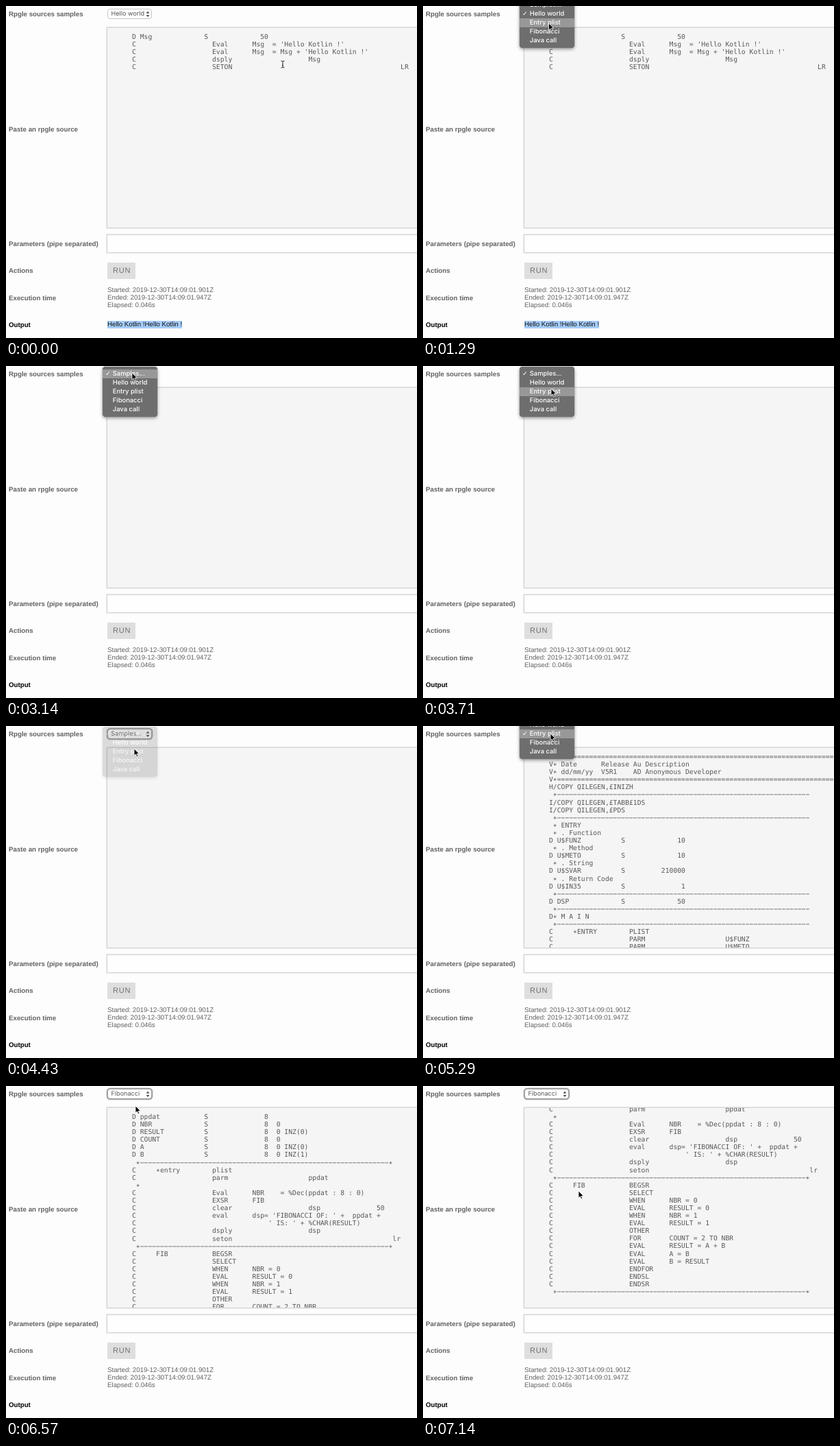
Write an HTML page that moves like this. It is 600 by 484 pixels and loops after 8 s.

```html
<!DOCTYPE html>
<html lang="en">
<head>
<meta charset="utf-8">
<title>RPGLE samples</title>
<style>
html, body { margin: 0; width: 100%; height: 100%; overflow: hidden; background: #fdfdfd; }
body { position: relative; font: 9.72px/12px "Liberation Sans", Arial, sans-serif; color: #626262;
  text-rendering: geometricPrecision; cursor: default; }
body > * { position: absolute; box-sizing: border-box; white-space: pre; }
b { left: 4px; }
#code, #param { left: 147px; width: 480px; border: 1px solid #d2d2d2; box-shadow: 0 0 2px #ccc; }
#code { top: 31px; height: 293px; background: #f6f5f6; overflow: hidden; }
#text { position: absolute; left: 36px; top: 8px; margin: 0; color: #585858;
  font: 9.72px/11.1px "DejaVu Sans Mono", monospace; }
#param { top: 333px; height: 27px; background: #fefefe; }
#run { left: 148px; top: 374px; width: 41px; height: 24px; background: #dedede; color: #707070;
  font-size: 11px; line-height: 24px; letter-spacing: .8px; padding-left: 8px; }
#log { left: 148px; top: 409px; line-height: 11.1px; }
#out { left: 148px; top: 459px; line-height: 11px; background: #a6cdfb; color: #111; }
#select { left: 148px; top: 4px; width: 65px; height: 15px; border: 1px solid #c6c6c6; border-radius: 4px;
  background: #fff; font: 9.1px/13px Inter, sans-serif; padding-left: 4.5px; color: #555; }
#select.focus { box-shadow: 0 0 0 1.3px #a2a2a2; border-color: #a2a2a2; }
#select svg { position: absolute; right: 2px; top: 2px; }
#menu { left: 140.5px; width: 80.5px; padding: 3.7px 0; border-radius: 4.5px; background: #6e6e6e; color: #fff;
  font: 500 9.4px/14.4px Inter, sans-serif; box-shadow: 0 2px 5px rgba(0,0,0,.4), 0 0 1px #444; }
#menu div { position: relative; padding-left: 15.3px; height: 13.05px; }
#menu .hot { background: #989898; }
#menu .on::before { content: "✓"; position: absolute; left: 4.5px; font-family: "DejaVu Sans", sans-serif; }
#arrow, #beam { left: 0; top: 0; overflow: visible; }
</style>
</head>
<body>
<b style="top:7px">Rpgle sources samples</b>
<b style="top:175px">Paste an rpgle source</b>
<b style="top:342px">Parameters (pipe separated)</b>
<b style="top:381px">Actions</b>
<b style="top:421px">Execution time</b>
<b style="top:460px;color:#000">Output</b>
<div id="code"><pre id="text"></pre></div>
<div id="param"></div>
<div id="run">RUN</div>
<div id="log">Started: 2019-12-30T14:09:01.901Z
Ended: 2019-12-30T14:09:01.947Z
Elapsed: 0.046s</div>
<div id="out">Hello Kotlin !Hello Kotlin !</div>
<div id="select"><span id="value"></span><svg width="6" height="10"><path d="M.6 3.8 3 .6 5.4 3.8zM.6 6 3 9.2 5.4 6z" fill="#555"/></svg></div>
<div id="menu"></div>
<svg id="arrow" width="9" height="13"><path d="M0 0V10.2L2.4 8 4 11.8 5.7 11.1 4.1 7.4H7.3Z" fill="#000" stroke="#fff" stroke-width=".8"/></svg>
<svg id="beam" width="6" height="12"><path d="M-2.5-5Q0-5 0-3.5Q0-5 2.5-5M0-3.5V3.5M-2.5 5Q0 5 0 3.5Q0 5 2.5 5M-1 1.5H1" fill="none" stroke="#222"/></svg>
<script>
const $ = id => document.getElementById(id);

// row(column, text, column, text, ...) builds one fixed-format source line
const row = (...p) => {
  let s = '';
  for (let i = 0; i < p.length; i += 2) s = s.padEnd(p[i]) + p[i + 1];
  return s;
};
const C = (op, ...rest) => row(0, 'C', 20, op, ...rest);
const D = (name, col, size) => row(0, 'D ' + name, 18, 'S', col, size);
const rule = 'V*' + '='.repeat(69);
const dash = ' *' + '−'.repeat(63);
const star = ' *' + '−'.repeat(62) + '*';

const names = ['Samples...', 'Hello world', 'Entry plist', 'Fibonacci', 'Java call'];
const sources = [
  [],
  [
    D('Msg', 32, '50'),
    C('Eval', 30, "Msg  = 'Hello Kotlin !'"),
    C('Eval', 30, "Msg  = Msg + 'Hello Kotlin !'"),
    C('dsply', 44, 'Msg'),
    C('SETON', 67, 'LR')
  ],
  [
    rule,
    row(0, 'V* Date', 13, 'Release Au Description'),
    row(0, 'V* dd/mm/yy', 13, 'V5R1', 21, 'AD Anonymous Developer'),
    rule, 'H/COPY QILEGEN,£INIZH',
    dash, 'I/COPY QILEGEN,£TABB£1DS', 'I/COPY QILEGEN,£PDS',
    dash, ' * ENTRY',
    ' * . Function', D('U$FUNZ', 32, '10'),
    ' * . Method', D('U$METO', 32, '10'),
    ' * . String', D('U$SVAR', 28, '210000'),
    ' * . Return Code', D('U$IN35', 33, '1'),
    dash, D('DSP', 32, '50'),
    dash, 'D* M A I N',
    dash, row(0, 'C', 6, '*ENTRY', 20, 'PLIST'),
    C('PARM', 44, 'U$FUNZ'), C('PARM', 44, 'U$METO')
  ],
  [
    D('ppdat', 33, '8'), D('NBR', 33, '8  0'), D('RESULT', 33, '8  0 INZ(0)'),
    D('COUNT', 33, '8  0'), D('A', 33, '8  0 INZ(0)'), D('B', 33, '8  0 INZ(1)'),
    star, row(0, 'C', 6, '*entry', 20, 'plist'),
    C('parm', 44, 'ppdat'), ' *',
    C('Eval', 30, 'NBR', 37, '= %Dec(ppdat : 8 : 0)'),
    C('EXSR', 30, 'FIB'),
    C('clear', 44, 'dsp', 61, '50'),
    C('eval', 30, "dsp= 'FIBONACCI OF: ' +  ppdat +"),
    C('', 34, "' IS: ' + %CHAR(RESULT)"),
    C('dsply', 44, 'dsp'),
    C('seton', 65, 'lr'),
    star, row(0, 'C', 6, 'FIB', 20, 'BEGSR'),
    C('SELECT'),
    C('WHEN', 30, 'NBR = 0'), C('EVAL', 30, 'RESULT = 0'),
    C('WHEN', 30, 'NBR = 1'), C('EVAL', 30, 'RESULT = 1'),
    C('OTHER'), C('FOR', 30, 'COUNT = 2 TO NBR'),
    C('EVAL', 30, 'RESULT = A + B'), C('EVAL', 30, 'A = B'), C('EVAL', 30, 'B = RESULT'),
    C('ENDFOR'), C('ENDSL'), C('ENDSR'), star
  ]
].map(lines => lines.join('\n').replaceAll('*', '∗')); // centred asterisks

// All times below are in steps of 1/7 second.
const path = [[0, 404, 85], [5, 168, 12], [7, 168, 12], [9, 183.5, 25], [13, 184, .5], [17, 184, .5],
  [19, 184, 10], [22, 184, 10], [26, 187, 33], [31, 187, 33], [35, 186, 11], [37, 186, 11],
  [41, 189, 29], [49, 189, 29], [50, 227, 153], [56, 227, 153]];
const menus = [
  { open: 7, fade: 17, sel: 1 },
  { open: 22, fade: 31, sel: 0, blink: 29 },
  { open: 37, fade: 45, sel: 2, blink: 43 }
];

const pointer = k => {
  const i = path.findIndex(p => p[0] > k);
  const [a, ax, ay] = path[i - 1], [b, bx, by] = path[i];
  let u = (k - a) / (b - a);
  u *= u * (3 - 2 * u);
  return [ax + (bx - ax) * u, ay + (by - ay) * u];
};

$('menu').innerHTML = names.map(n => `<div>${n}</div>`).join('');
const items = [...$('menu').children];

function draw(k) {
  const [x, y] = pointer(k);
  const value = k < 18 ? 1 : k < 32 ? 0 : k < 46 ? 2 : 3;
  $('value').textContent = names[value];
  $('select').className = k < 7 ? '' : 'focus';
  $('text').textContent = sources[value];
  $('text').style.transform = `translateY(${k < 50 ? 0 : -100}px)`;
  $('out').hidden = value != 1;

  const m = menus.find(m => k >= m.open && k <= m.fade);
  $('menu').hidden = !m;
  if (m) {
    const top = 1.2 - 13.05 * m.sel;
    const hot = Math.floor((y - top - 3.7) / 13.05);
    const lit = k != m.blink && k != m.fade;
    $('menu').style.top = top + 'px';
    $('menu').style.opacity = k == m.fade ? .23 : 1;
    items.forEach((e, i) => {
      e.className = (i == m.sel ? 'on ' : '') + (lit && i == hot ? 'hot' : '');
    });
  }

  const beam = k < 5 && y > 32;
  $('beam').style.display = beam ? '' : 'none';
  $('arrow').style.display = beam ? 'none' : '';
  $(beam ? 'beam' : 'arrow').style.transform = `translate(${x}px,${y}px)`;
}

const start = performance.now();
let last = -1;
function tick() {
  const t = (performance.now() - start) % 8000;
  const k = Math.min(55, Math.floor(t * 7 / 1000 + .05));
  if (k != last) draw(last = k);
  requestAnimationFrame(tick);
}
tick();
</script>
</body>
</html>
```
